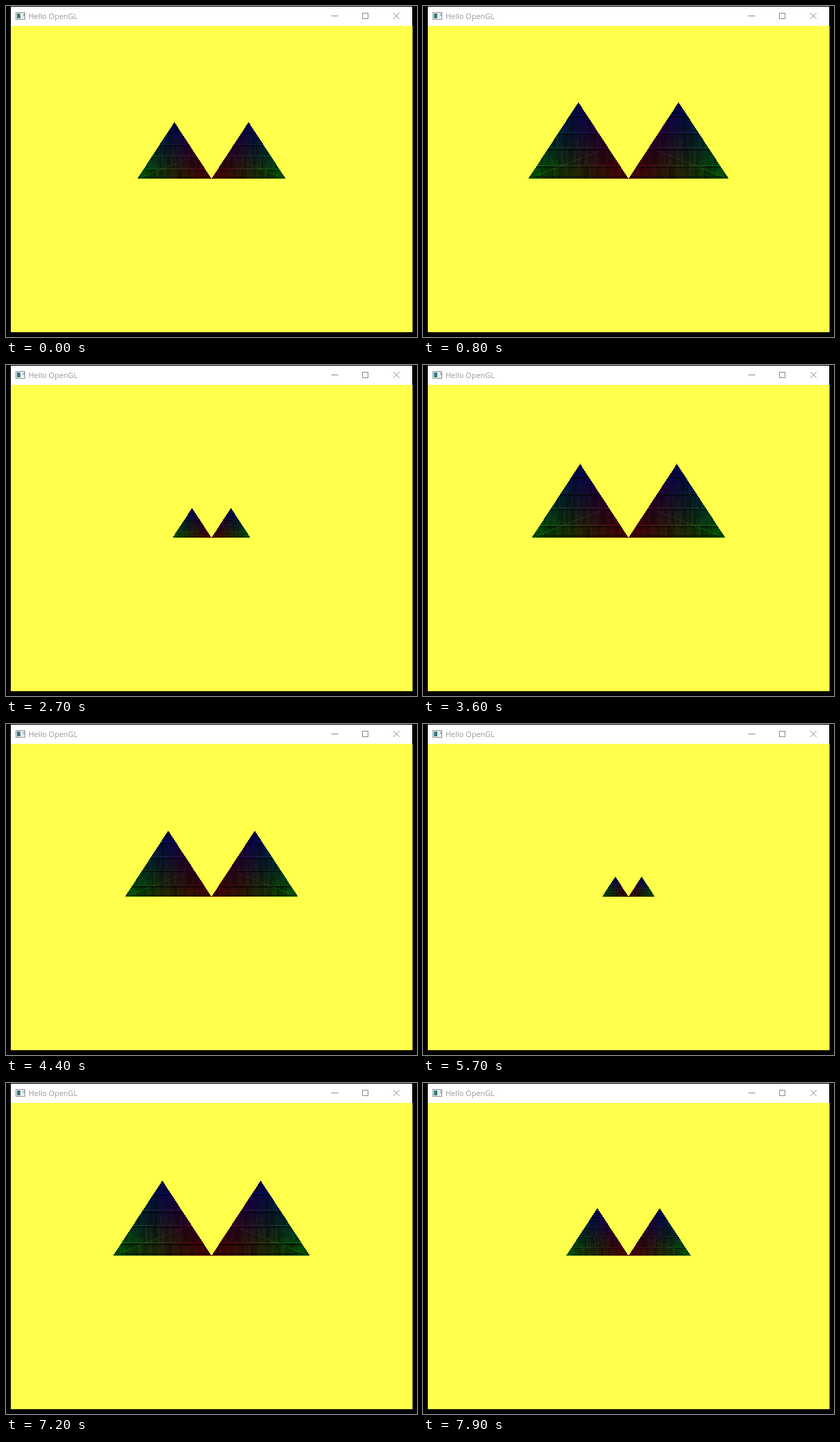
These frames come from a looping animation (600 px wide and 483 px high, 8 s). An HTML page with a canvas:

```html
<!DOCTYPE html>
<html>
<head>
<meta charset="utf-8">
<title>Hello OpenGL</title>
<style>
  html, body { margin: 0; width: 100%; height: 100%; overflow: hidden; background: #000; }
  svg, canvas { position: absolute; left: 0; top: 0; }
  canvas { left: 150px; top: 138px; }
  text { font: 11px "Open Sans", "Noto Sans", sans-serif; fill: #999; }
</style>
</head>
<body>
<svg width="600" height="483">
  <rect x="7" y="1" width="586" height="28.5" fill="#fff"/>
  <rect x="7" y="29" width="586.5" height="447" fill="#ffff4c"/>
  <rect x="14.5" y="9.5" width="13" height="10" fill="#f4f4f4" stroke="#8a8f92"/>
  <rect x="16" y="11" width="5" height="7" fill="#327f80"/>
  <path d="M23.5 11v7" stroke="#ddd"/>
  <path d="M26 11v4" stroke="#777"/>
  <text x="33" y="19">Hello OpenGL</text>
  <g fill="none" stroke="#888">
    <path d="M475 14.5h10M565.5 10l9 9M574.5 10l-9 9"/>
    <rect x="520.5" y="10.5" width="8" height="8"/>
  </g>
</svg>
<canvas id="view" width="300" height="116"></canvas>
<script>
const W = 300, H = 116, BASE = 114, LOOP = 8000, STEP = 100;
const ctx = document.getElementById('view').getContext('2d');
const seams = [.17, .4, .6, .83];

function noise(i, j) {
  const n = Math.sin(i * 127.1 + j * 311.7) * 43758.5;
  return n - Math.floor(n);
}

// Brightness of the dark wooden crate
function wood(u, v) {
  const plank = seams.filter(s => s < v).length;
  let k = .17 + .12 * noise(Math.floor(u * 40), plank)
              + .08 * noise(Math.floor(u * 90), Math.floor(v * 16));
  for (const s of seams) {
    const d = v - s;
    if (Math.abs(d) < .008) k += .16;
    else if (d < 0 && d > -.03) k *= .55;
  }
  if (v < .012) k += .15;
  else if (v < .035) k *= .6;
  if (u < .8 && Math.abs(v - u * .51) < .009) k += .13;
  return k;
}

function draw(ms) {
  const size = 146.5 * Math.abs(Math.sin(ms * .001003 - 2.31));
  const height = size * .763;
  const img = ctx.createImageData(W, H);
  for (let y = 0; y < BASE; y++) {
    const v = (BASE - y - .5) / height;
    if (v > 1) continue;
    for (let x = 0; x < W; x++) {
      const d = Math.abs(x + .5 - W / 2) / size;
      const red = 1 - d - v / 2, green = d - v / 2;
      if (red < 0 || green < 0) continue;
      const k = 255 * wood(1 - d, v);
      img.data.set([k * red, k * green, k * v, 255], (y * W + x) * 4);
    }
  }
  ctx.putImageData(img, 0, 0);
}

const start = performance.now();
let last = -1;
function tick() {
  const t = Math.floor((performance.now() - start) % LOOP / STEP) * STEP;
  if (t !== last) draw(last = t);
  requestAnimationFrame(tick);
}
tick();
</script>
</body>
</html>
```
